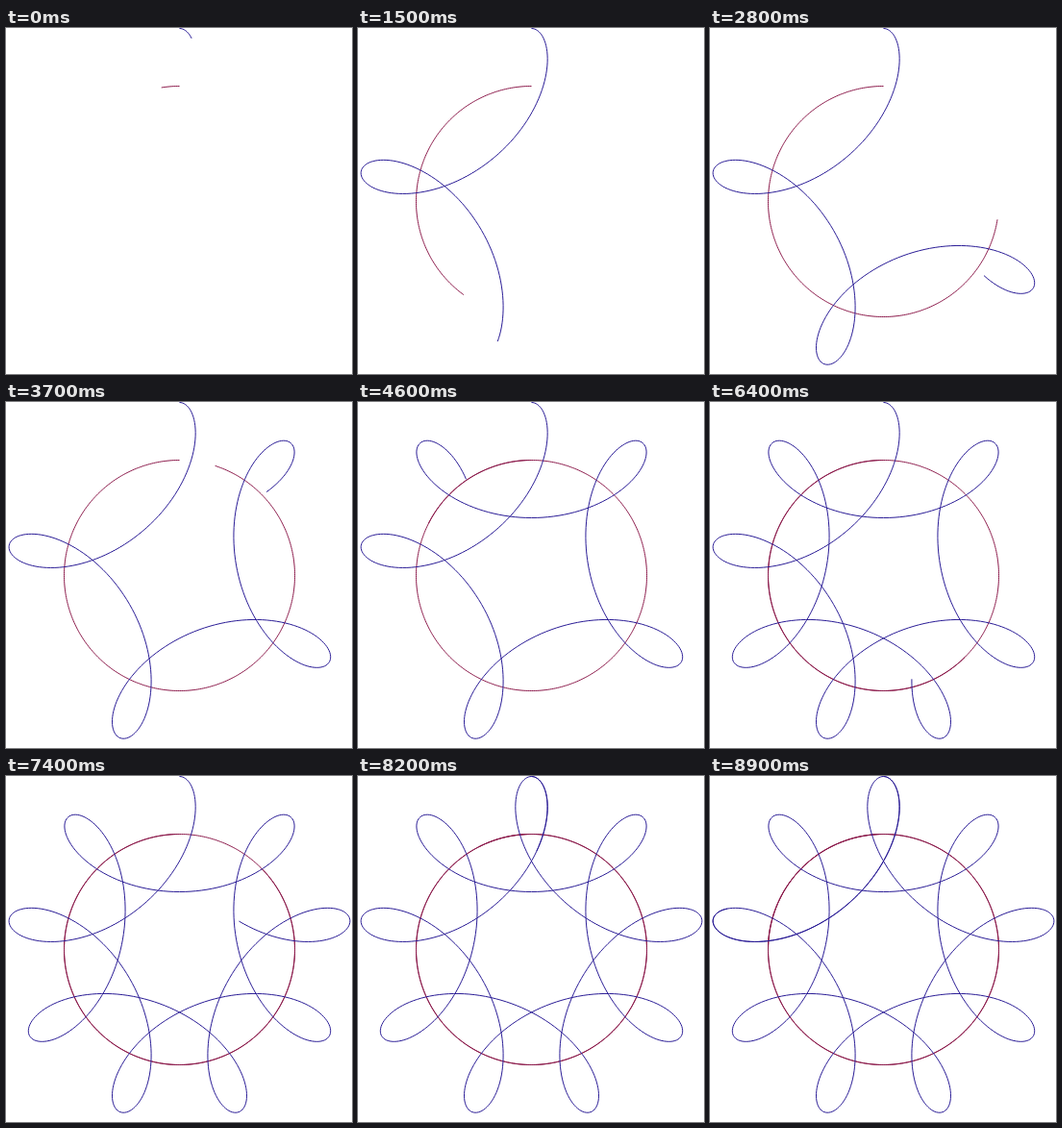
An HTML page with a canvas for the animation above (9000 ms loop, 360 by 360 pixels).

```html
<!DOCTYPE html>
<html lang="en">
<head>
<meta charset="utf-8">
<title>Epicycle</title>
<style>
html, body { margin: 0; width: 100%; height: 100%; overflow: hidden; background: #fff; }
canvas { display: block; }
</style>
</head>
<body>
<canvas id="stage" width="360" height="360"></canvas>
<script>
const ctx = document.getElementById('stage').getContext('2d');
const CENTER = 180.5, BIG = 120, SMALL = 60, RATIO = -3.5;
const STEP_MS = 100, STEPS = 90, STEP_DEG = 9;

// Angles run counterclockwise from the top.
const polar = (r, a) => [-r * Math.sin(a), -r * Math.cos(a)];

function carrier(a) {
  const [x, y] = polar(BIG, a);
  return [CENTER + x, CENTER + y];
}

function tracer(a) {
  const [x, y] = carrier(a);
  const [dx, dy] = polar(SMALL, a * RATIO);
  return [x + dx, y + dy];
}

// Each lap is stroked on its own so that retraced lines darken.
function trace(point, end, lap, color) {
  ctx.strokeStyle = color;
  for (let from = 0; from < end; from += lap) {
    const to = Math.min(end, from + lap);
    ctx.beginPath();
    for (let d = from; d <= to; d++) ctx.lineTo(...point(d * Math.PI / 180));
    ctx.stroke();
  }
}

function draw(time) {
  const step = Math.floor(time / STEP_MS) % STEPS;
  const end = (step + 1) * STEP_DEG;
  ctx.fillStyle = '#fff';
  ctx.fillRect(0, 0, 360, 360);
  ctx.lineWidth = 1;
  ctx.lineJoin = 'round';
  trace(carrier, end, 360, '#8c1a4b');
  trace(tracer, end, 720, '#2a1c96');
}

let start = null;
function tick() {
  const now = performance.now();
  if (start === null) start = now;
  draw(now - start);
  requestAnimationFrame(tick);
}
tick();
</script>
</body>
</html>
```
